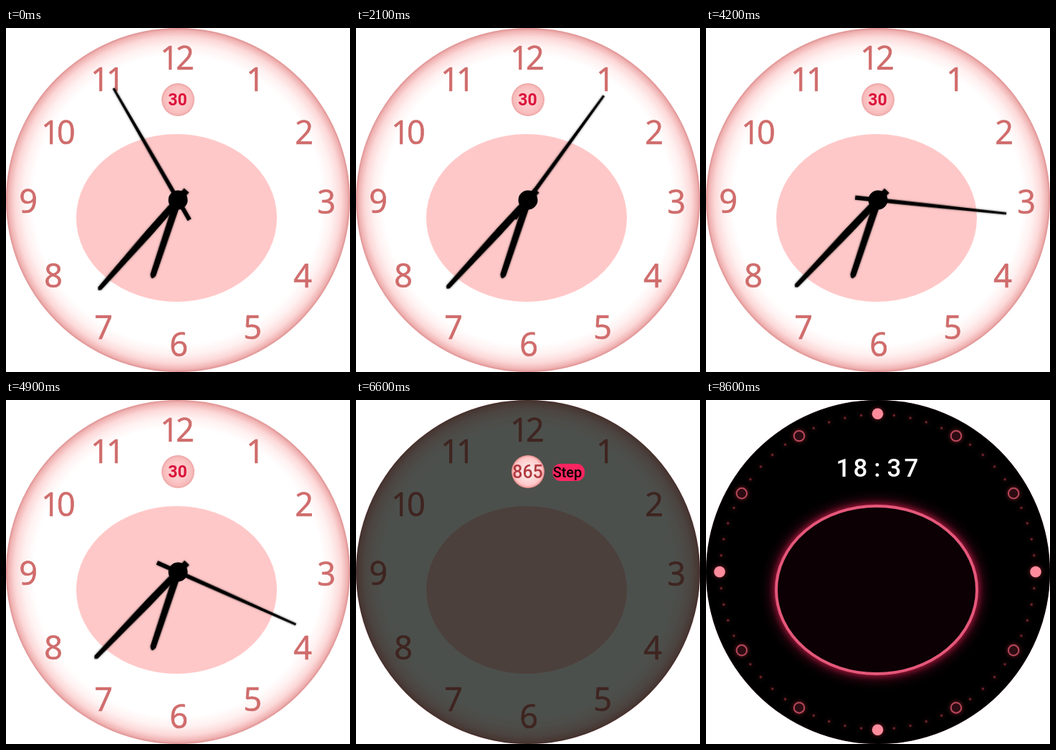
An HTML page that plays this animation: 480x480 px, repeating every 9.9 s.

```html
<!DOCTYPE html>
<html lang="en">
<head>
<meta charset="utf-8">
<title>Pink watch face</title>
<style>
  html, body { margin: 0; width: 100%; height: 100%; overflow: hidden; background: #fff; }
  svg { display: block; width: 100vw; height: 100vh; }
  text { text-anchor: middle; font-family: Roboto, sans-serif; }

  .hands, .veil, .night, .item { animation: 9900ms step-end infinite; }
  .hands { --sec: -5; animation-name: tick; }
  .hands g { transform-origin: 240px 240px; filter: url(#soft); }
  .hour { transform: rotate(198.4deg); }
  .minute { transform: rotate(calc(222deg + var(--sec) * .1deg)); }
  .second { transform: rotate(calc(var(--sec) * 6deg)); }
  .veil { animation-name: veil; }
  .night { animation-name: night; }
  .date { animation-name: date; }
  .step { animation-name: step; }
  .calorie { animation-name: calorie; }

  @keyframes tick {
    0% { --sec: -5; opacity: 1; }
    7.0707% { --sec: -1; opacity: 1; }
    14.1414% { --sec: 2; opacity: 1; }
    21.2121% { --sec: 6; opacity: 1; }
    28.2828% { --sec: 9; opacity: 1; }
    35.3535% { --sec: 12; opacity: 1; }
    42.4242% { --sec: 16; opacity: 1; }
    49.4949% { --sec: 19; opacity: 1; }
    56.5656%, 100% { --sec: 19; opacity: 0; }
  }
  @keyframes veil { 0% { opacity: 0; } 56.5656% { opacity: 1; } 86.8686%, 100% { opacity: 0; } }
  @keyframes night { 0% { opacity: 0; } 86.8686%, 100% { opacity: 1; } }
  @keyframes date { 0% { opacity: 1; } 66.6666%, 100% { opacity: 0; } }
  @keyframes step { 0% { opacity: 0; } 66.6666% { opacity: 1; } 76.7676%, 100% { opacity: 0; } }
  @keyframes calorie { 0% { opacity: 0; } 76.7676%, 100% { opacity: 1; } }

  #numerals text { font: 45px "Open Sans", sans-serif; letter-spacing: -4px; fill: #d06c6c; stroke: #d06c6c; stroke-width: .7; }
  .day-date { font-size: 23px; font-weight: 600; fill: #dc143c; }
  .value { font-size: 25px; font-weight: 500; fill: #b03a40; }
  .label { font-size: 20px; font-weight: 500; }
  .time { font-size: 35px; font-weight: 500; letter-spacing: 4px; fill: #fff; text-anchor: start; }
  .neon { fill: #0c0004; stroke: #e4587a; stroke-width: 4;
    filter: drop-shadow(0 0 4px #b01840) drop-shadow(0 0 9px #801030); }
  .dots, #marks { filter: drop-shadow(0 0 3px #80202c); }
</style>
</head>
<body>
<svg viewBox="0 0 480 480">
  <defs>
    <radialGradient id="dial" gradientUnits="userSpaceOnUse" cx="240" cy="240" r="240">
      <stop offset=".84" stop-color="#fff"/>
      <stop offset=".9" stop-color="#fff1f1"/>
      <stop offset=".95" stop-color="#fcd8d8"/>
      <stop offset=".985" stop-color="#f0b2b2"/>
      <stop offset="1" stop-color="#de9090"/>
    </radialGradient>
    <radialGradient id="badge">
      <stop offset=".5" stop-color="#fbcaca"/>
      <stop offset=".85" stop-color="#f8bcbc"/>
      <stop offset="1" stop-color="#eda4a4"/>
    </radialGradient>
    <radialGradient id="lit">
      <stop offset=".3" stop-color="#ffe6e6"/>
      <stop offset=".85" stop-color="#ffc6c6"/>
      <stop offset="1" stop-color="#e98a8a"/>
    </radialGradient>
    <filter id="soft" filterUnits="userSpaceOnUse" x="0" y="0" width="480" height="480">
      <feDropShadow dx="0" dy="0" stdDeviation="1.5" flood-color="#000" flood-opacity=".5"/>
    </filter>
    <clipPath id="slot"><rect x="270" y="84" width="50" height="34"/></clipPath>
    <ellipse id="face" cx="238" cy="265" rx="140" ry="117"/>
  </defs>

  <circle cx="240" cy="240" r="240" fill="url(#dial)"/>
  <g id="numerals"></g>
  <circle cx="240" cy="100" r="23" fill="url(#badge)"/>
  <text class="day-date" x="239.5" y="108">30</text>
  <use href="#face" fill="#ffc8c8"/>

  <g class="hands">
    <g class="hour"><path d="M235 240L236 130Q240 120 244 130L245 240Z"/></g>
    <g class="minute"><path d="M235.5 258L235 180L237 75L240 72L243 75L245 180L244.5 258Z"/></g>
    <g class="second"><path d="M237 272L237.5 170L238.5 60H241.5L242.5 170L243 272Z"/></g>
    <circle cx="240" cy="240" r="13.5"/>
  </g>

  <g class="veil">
    <circle cx="240" cy="240" r="240" fill="#000600" fill-opacity=".7"/>
    <circle cx="240" cy="100" r="23" fill="url(#lit)"/>
    <rect x="274.5" y="89" width="44.5" height="24" rx="11" fill="#ff2560"/>
    <g clip-path="url(#slot)">
      <text class="label item date" x="295" y="108">Date</text>
      <text class="label item step" x="295" y="108">Step</text>
      <text class="label item calorie" x="295" y="108">Calorie</text>
    </g>
    <text class="value item date" x="239.5" y="109">28</text>
    <text class="value item step" x="239.5" y="109">865</text>
    <text class="value item calorie" x="239.5" y="109">235</text>
  </g>

  <g class="night">
    <circle cx="240" cy="240" r="240"/>
    <circle class="dots" cx="239.5" cy="239.8" r="219.5" fill="none" stroke="#6a2228" stroke-width="3.6"
      stroke-linecap="round" pathLength="60" stroke-dasharray="0 1"/>
    <g id="marks"></g>
    <text class="time" x="181.5" y="107" dx="0 0 5 5">18:37</text>
    <use href="#face" class="neon"/>
  </g>
</svg>
<script>
  const add = (parent, tag, attrs, text = "") => {
    const el = document.createElementNS("http://www.w3.org/2000/svg", tag);
    for (const key in attrs) el.setAttribute(key, attrs[key]);
    el.textContent = text;
    document.getElementById(parent).append(el);
  };

  // Anchor points of the numerals 1 to 12
  const spots = [[346, 71], [414, 145], [445, 242], [412, 345], [342, 417], [239, 441],
    [134, 417], [64, 345], [29, 241], [71, 145], [140, 71], [237, 41]];

  spots.forEach(([x, y], i) => {
    const hour = i + 1;
    add("numerals", "text", { x, y: y + 17 }, hour);

    const angle = hour * Math.PI / 6;
    const main = hour % 3 === 0;
    const dist = main ? 220.5 : 219;
    add("marks", "circle", {
      cx: 239.5 + dist * Math.sin(angle),
      cy: 239.8 - dist * Math.cos(angle),
      r: main ? 7.8 : 7.2,
      fill: main ? "#ff8c9c" : "#2c0c12",
      stroke: main ? "none" : "#b8485a",
      "stroke-width": 2
    });
  });
</script>
</body>
</html>
```
